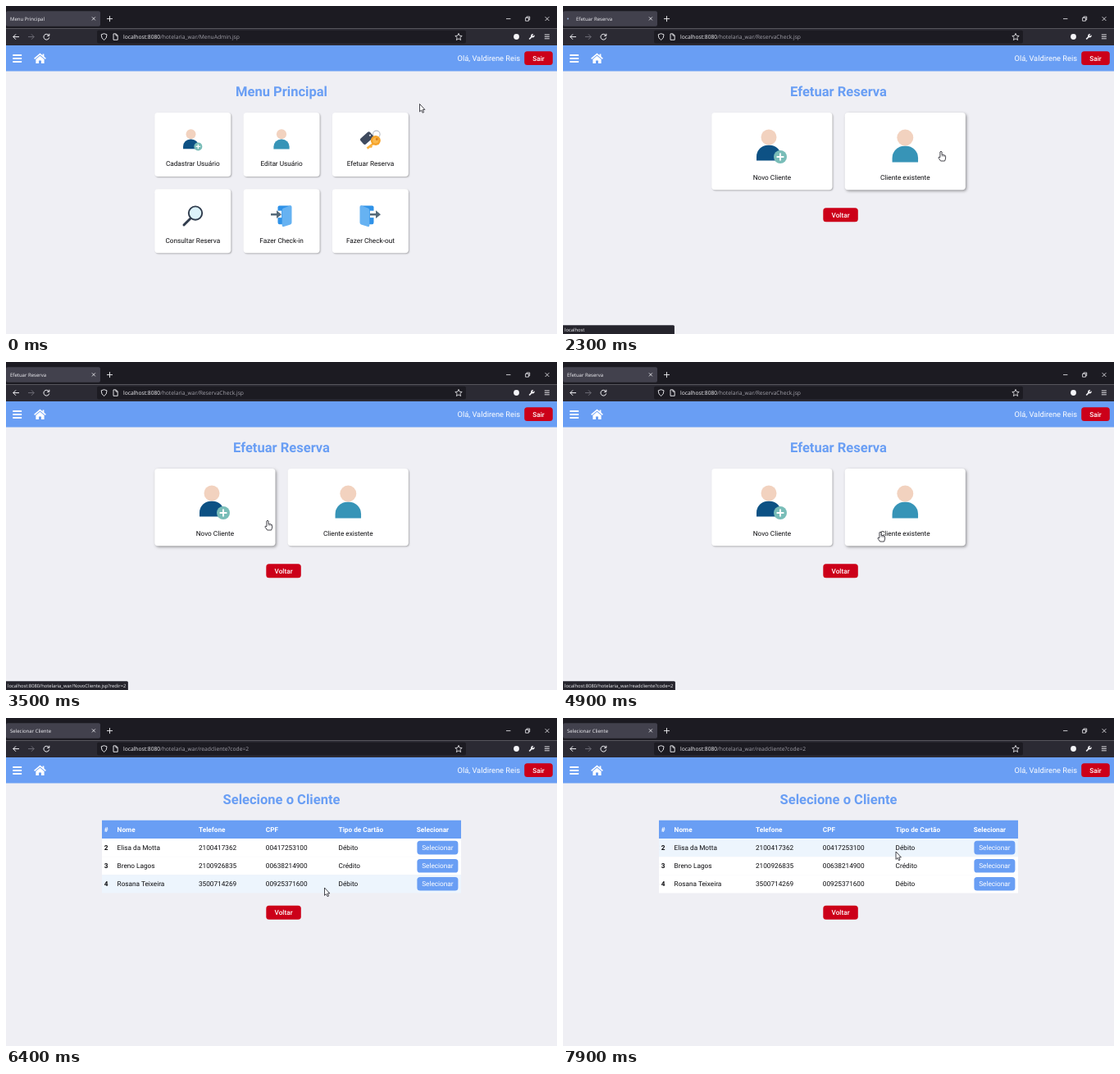
An HTML page with a canvas for the animation above (8 s loop, 672 px wide and 400 px high).

```html
<!DOCTYPE html>
<html lang="pt-BR">
<head>
<meta charset="utf-8">
<title>Menu Principal</title>
<style>
html, body { margin: 0; width: 100%; height: 100%; overflow: hidden; background: #efeff4; }
canvas { display: block; width: 100%; height: 100%; }
</style>
</head>
<body>
<canvas id="stage" width="672" height="400"></canvas>
<script>
const ctx = document.getElementById('stage').getContext('2d');
const LOOP = 8000, STEP = 100;
const BLUE = '#699ef4', RED = '#cc0019', INK = '#0c0c0f', LIGHT = '#f4f4f8';
const UI = '"Open Sans", "Noto Sans", sans-serif';
const HOST = 'localhost:8080', ROOT = '/hotelaria_war/';
const LINK = HOST + ROOT;

const pages = [
  { from: 0, tab: 'Menu Principal', path: 'MenuAdmin.jsp', draw: drawMenu },
  { from: 2300, tab: 'Efetuar Reserva', path: 'ReservaCheck.jsp', draw: drawBooking },
  { from: 5600, tab: 'Selecionar Cliente', path: 'readcliente?code=2', draw: drawClients }
];

// time, x, y of the pointer tip
const track = [
  [400, 504.5, 119.5], [600, 503, 122], [900, 490, 141], [1200, 465, 172], [1300, 461, 177],
  [3100, 461, 177], [3300, 395, 187], [3500, 319, 193], [3700, 285, 196], [4000, 268, 198],
  [4100, 278, 199], [4300, 347, 203], [4500, 387, 207], [5500, 387, 207], [5600, 388.5, 207],
  [7100, 388.5, 207], [7200, 391, 199], [7300, 393, 189.5], [7600, 400, 174], [7900, 406, 163]
];

// time, text, opacity, fixed width
const statusLog = [
  [0, ''],
  [1200, LINK + 'ReservaCheck.jsp', .35], [1300, LINK + 'ReservaCheck.jsp', .8], [1400, LINK + 'ReservaCheck.jsp', 1],
  [2300, 'localhost', 1, 136], [2400, ''],
  [2500, LINK + 'readcliente?code=2', 1],
  [3400, LINK + 'NovoCliente.jsp?redir=2', 1],
  [4300, LINK + 'readcliente?code=2', 1],
  [5600, '']
];

const menuCards = [
  ['Cadastrar Usuário', () => person(225.5, 156.3, .63, '#0d5184', true)],
  ['Editar Usuário', () => person(336, 156.3, .64, '#3794b7')],
  ['Efetuar Reserva', drawKeys],
  ['Consultar Reserva', drawLens],
  ['Fazer Check-in', () => drawDoor(342.5, -1)],
  ['Fazer Check-out', () => drawDoor(437.5, 1)]
].map(([label, icon], i) => ({
  label, icon, x: 181.3 + i % 3 * 108.3, y: i < 3 ? 130 : 223.3, w: 93, h: 78, labelY: 62.5
}));

const bookingCards = [
  ['Novo Cliente', () => person(251, 160, 1, '#0d5184', true)],
  ['Cliente existente', () => person(417.3, 160.5, 1.05, '#3794b7')]
].map(([label, icon], i) => ({
  label, icon, x: 181.3 + i * 162.4, y: 130, w: 147.2, h: 94.3, labelY: 79.2
}));

const cols = [119.8, 135.6, 235, 316.8, 405.6, 500.8];
const heads = ['#', 'Nome', 'Telefone', 'CPF', 'Tipo de Cartão', 'Selecionar'];
const clients = [
  ['2', 'Elisa da Motta', '2100417362', '00417253100', 'Débito'],
  ['3', 'Breno Lagos', '2100926835', '00638214900', 'Crédito'],
  ['4', 'Rosana Teixeira', '3500714269', '00925371600', 'Débito']
];

const last = (list, test) => list.filter(test).pop();

function pointerAt(t) {
  const i = track.findIndex(p => p[0] > t);
  if (i === 0) return { x: track[0][1], y: track[0][2] };
  if (i < 0) { const p = track[track.length - 1]; return { x: p[1], y: p[2] }; }
  const [a, b] = [track[i - 1], track[i]];
  const k = (t - a[0]) / (b[0] - a[0]);
  return { x: a[1] + (b[1] - a[1]) * k, y: a[2] + (b[2] - a[2]) * k };
}

function rect(x, y, w, h, color, r = 0) {
  ctx.fillStyle = color;
  ctx.beginPath();
  ctx.roundRect(x, y, w, h, r);
  ctx.fill();
}

function disc(x, y, r, color) {
  ctx.fillStyle = color;
  ctx.beginPath();
  ctx.arc(x, y, r, 0, 7);
  ctx.fill();
}

function ring(x, y, r, color, width) {
  ctx.strokeStyle = color;
  ctx.lineWidth = width;
  ctx.beginPath();
  ctx.arc(x, y, r, 0, 7);
  ctx.stroke();
}

function fill(d, color) {
  ctx.fillStyle = color;
  ctx.fill(new Path2D(d));
}

function line(d, color = LIGHT, width = 1) {
  ctx.strokeStyle = color;
  ctx.lineWidth = width;
  ctx.stroke(new Path2D(d));
}

function at(x, y, draw) {
  ctx.save();
  ctx.translate(x, y);
  draw();
  ctx.restore();
}

// y is the middle of the capitals
function text(str, x, y, size, color = INK, { weight = 400, align = 'left', family = 'Roboto, sans-serif' } = {}) {
  ctx.font = `${weight} ${size}px ${family}`;
  ctx.textAlign = align;
  ctx.fillStyle = color;
  ctx.fillText(str, x, y + size * .356);
}

const label = (str, x, y, color, weight) => text(str, x, y, 8.22, color, { weight, align: 'center' });
const uiText = (str, x, y, size, color) => text(str, x, y, size, color, { family: UI });

function button(str, x, y, w, h, color, weight = 500) {
  rect(x, y, w, h, color, 3.6);
  label(str, x + w / 2, y + h / 2 + .1, '#fff', weight);
}

const heading = (str, y) => text(str, 336, y, 16.55, BLUE, { weight: 700, align: 'center' });

function person(x, y, s, color, plus) {
  at(x, y, () => {
    ctx.scale(s, s);
    disc(0, 0, 9.5, '#f2d2bf');
    ctx.fillStyle = color;
    ctx.beginPath();
    ctx.roundRect(-15, 9.7, 30, 18.8, [14, 14, 0, 0]);
    ctx.fill();
    if (!plus) return;
    disc(14, 24, 8, '#79bdb8');
    line('M9.6 24H18.4M14 19.6V28.4', '#fff', 2);
  });
}

function drawKeys() {
  ring(451.8, 156.4, 4.3, '#b8bcc4', 1.1);
  at(440.2, 161, () => {
    ctx.rotate(-.72);
    rect(-8, -4.7, 15.5, 9.4, '#3f4a5e', 2);
    disc(5, 0, 1.1, '#dfe3ea');
  });
  line('M449 167L440.5 173.6M444.4 170.4L446 172.6', '#fbb23f', 2.6);
  disc(450.8, 164, 6, '#f5a32a');
  disc(450.8, 164, 3.6, '#fbb94d');
  disc(452.3, 162.5, 1.4, '#d77b1a');
}

function drawLens() {
  ctx.lineCap = 'round';
  line('M224.8 259.3L217 267', '#2f3b4c', 3);
  ctx.lineCap = 'butt';
  disc(231, 252.6, 8, '#dcf2fa');
  ring(231, 252.6, 8.2, '#2f3b4c', 1.9);
}

function drawDoor(x, dir) {
  at(x, 256, () => {
    ctx.scale(dir, 1);
    fill('M-5 -12.6H9Q11 -12.6 11 -10.6V8Q11 10.2 9 10.2H4Z', '#2f92e8');
    rect(6.4, -6.3, 6, 8.4, '#fff');
    fill('M-6 -11Q-6 -13.2 -3.8 -12.4L4 -9.5Q5.8 -8.8 5.8 -7V11.4Q5.8 13.6 3.6 13L-4.4 10.4Q-6 9.8 -6 8Z', '#66b2f2');
  });
  const ax = dir > 0 ? 444 : 323;
  fill(`M${ax} 252.9H${ax + 7}V249.3L${ax + 13} 254.2L${ax + 7} 259.1V255.5H${ax}Z`, '#566a79');
}

function inside(p, c) {
  return p.x >= c.x && p.x <= c.x + c.w && p.y >= c.y && p.y <= c.y + c.h;
}

// returns true when the pointer is on a card
function drawCards(cards, p) {
  let hot = false;
  for (const c of cards) {
    const over = inside(p, c);
    hot = hot || over;
    ctx.save();
    ctx.shadowColor = over ? 'rgba(0,0,0,.38)' : 'rgba(0,0,0,.28)';
    ctx.shadowBlur = over ? 3.5 : 1.8;
    ctx.shadowOffsetX = ctx.shadowOffsetY = over ? 1.4 : 1;
    rect(c.x, c.y, c.w, c.h, '#fff', 4);
    ctx.restore();
    c.icon();
    label(c.label, c.x + c.w / 2, c.y + c.labelY);
  }
  return hot;
}

function drawMenu(p) {
  heading('Menu Principal', 104.6);
  return drawCards(menuCards, p);
}

function drawBooking(p) {
  heading('Efetuar Reserva', 104.6);
  button('Voltar', 317.3, 246.3, 42.5, 17, RED);
  return drawCards(bookingCards, p);
}

function drawClients(p) {
  heading('Selecione o Cliente', 99.6);
  rect(117, 124.8, 438, 22.3, BLUE);
  heads.forEach((h, i) => text(h, cols[i], 136, 8.22, '#fff', { weight: 700 }));
  clients.forEach((row, r) => {
    const y = 147.1 + r * 22.1;
    const over = p.y >= y && p.y < y + 22.1;
    rect(117, y, 438, 22.1, over ? '#edf5fd' : '#fff');
    row.forEach((cell, i) => text(cell, cols[i], y + 11, 8.22, INK, { weight: i ? 400 : 700 }));
    button('Selecionar', 501.4, y + 2.7, 50, 16.6, BLUE, 400);
  });
  button('Voltar', 317.3, 228.8, 42.5, 17, RED);
  return false;
}

function drawTab(page, t) {
  const age = t - page.from;
  const loading = page.from > 0 && age < STEP;
  rect(0, 6.3, 115, 18.5, '#42414d', 2);
  const k = (age - STEP) / 400;
  if (page.from > 0 && k >= 0 && k < 1) {
    const r = 10 + k * 60;
    const glow = ctx.createRadialGradient(9, 15.5, 0, 9, 15.5, r);
    glow.addColorStop(0, `rgba(20,90,180,${.6 * (1 - k)})`);
    glow.addColorStop(.7, `rgba(20,90,180,${.5 * (1 - k)})`);
    glow.addColorStop(1, 'rgba(20,90,180,0)');
    rect(0, 6.3, 115, 18.5, glow, 2);
  }
  if (loading) disc(6, 15.5, 1.1, '#8fa3c4');
  uiText(page.tab, loading ? 16 : 5, 15.6, 6.02, LIGHT);
  line('M104.9 13.4l4 4m0 -4l-4 4', LIGHT, .8);
}

function drawBrowser(page, t) {
  rect(0, 0, 672, 27.5, '#1c1b22');
  rect(0, 27.5, 672, 20.5, '#2b2a33');
  drawTab(page, t);
  line('M123 15.6h7M126.5 12.1v7', LIGHT, .9);
  line('M610 15.6h5.4M657.6 13.2l4.8 4.8m0 -4.8l-4.8 4.8', LIGHT, .8);
  line('M633.6 14.4h3.8v3.8h-3.8zM634.9 14.2v-1.2h3.8v3.8h-1.2', LIGHT, .8);

  line('M16 37.6H8.8M12 34.4L8.8 37.6L12 40.8', LIGHT, 1);
  line('M27 37.6H34.2M31 34.4L34.2 37.6L31 40.8', '#6d6c75', 1);
  line('M52.2 35.8A3.4 3.4 0 1 0 52.7 38.4M52.8 33.8V36.4H50.2', LIGHT, 1);

  rect(111, 29.8, 450, 15.6, '#1c1b22', 2);
  line('M119.6 33.7L123 34.8Q123.2 39.6 119.6 41.5Q116 39.6 116.2 34.8Z', LIGHT, .9);
  line('M131 33.9h3.2l2 2v5.4H131zM134 34v2.1h2', LIGHT, .9);
  uiText(HOST, 143, 37.8, 6.71, LIGHT);
  const hostWidth = ctx.measureText(HOST).width;
  uiText(ROOT + page.path, 143 + hostWidth, 37.8, 6.71, '#a2a1aa');
  line('M552 33.4l1.2 2.8 3 .3-2.3 2 .7 3-2.6-1.6-2.6 1.6.7-3-2.3-2 3-.3z', LIGHT, .8);

  disc(622.5, 37.5, 3.4, LIGHT);
  line('M638.2 40.5L642 36.7', LIGHT, 1.7);
  disc(642.4, 36.2, 2.2, LIGHT);
  line('M642.4 36.2L645 33.6', '#2b2a33', 1.4);
  line('M656.8 35h6M656.8 37.4h6M656.8 39.8h6', LIGHT, .9);
}

function drawHeader() {
  rect(0, 48, 672, 31.5, BLUE);
  for (const y of [59, 63, 67]) rect(8.2, y, 11, 1.9, '#fff', .6);
  line('M34.6 64.4L41.5 58.6L48.4 64.4', '#fff', 1.5);
  fill('M36.4 65L41.5 60.7L46.6 65V70H43V66.4H40V70H36.4ZM44.6 58.6H46.4V62H44.6Z', '#fff');
  text('Olá, Valdirene Reis', 627, 63.8, 9.3, '#fff', { align: 'right' });
  button('Sair', 632.2, 55.2, 34.6, 16.9, RED);
}

function drawStatus(t) {
  const [, str, alpha, width] = last(statusLog, s => s[0] <= t);
  if (!str) return;
  ctx.save();
  ctx.globalAlpha = alpha;
  ctx.font = `400 5.8px ${UI}`;
  const w = width || ctx.measureText(str).width + 4.6;
  rect(0, 389.2, w, 10.8, '#42414d', [0, 1.5, 0, 0]);
  rect(0, 389.8, w - .6, 10.2, '#25242c', [0, 1, 0, 0]);
  uiText(str, 2, 395, 5.8, LIGHT);
  ctx.restore();
}

function drawPointer(p, hand) {
  const d = hand
    ? 'M-1.1 1Q0 -.7 1.1 1V4.3Q2 3.8 2.7 4.7Q3.6 4.2 4.2 5.1Q5.5 5 5.6 6.5V9L4.6 12H-.4L-3 8.2Q-3.4 6.5 -1.1 7.6Z'
    : 'M0 0V9.4L2.1 7.5L3.6 10.7L5.1 10L3.7 6.9H6.4Z';
  at(p.x, p.y, () => {
    ctx.lineJoin = 'round';
    fill(d, '#fff');
    line(d, '#1a1a22', .8);
    if (hand) line('M1.1 4.3V6.5M2.8 4.8V6.7M4.3 5.2V6.9', '#1a1a22', .5);
    ctx.lineJoin = 'miter';
  });
}

function render(t) {
  const page = last(pages, p => p.from <= t);
  const pointer = pointerAt(t);
  rect(0, 0, 672, 400, '#efeff4');
  const hand = page.draw(pointer);
  drawHeader();
  drawBrowser(page, t);
  drawStatus(t);
  drawPointer(pointer, hand);
}

ctx.textRendering = 'geometricPrecision';
const start = performance.now();
function tick() {
  const t = (performance.now() - start) % LOOP;
  render(Math.floor(t / STEP) * STEP);
  requestAnimationFrame(tick);
}
tick();
</script>
</body>
</html>
```
